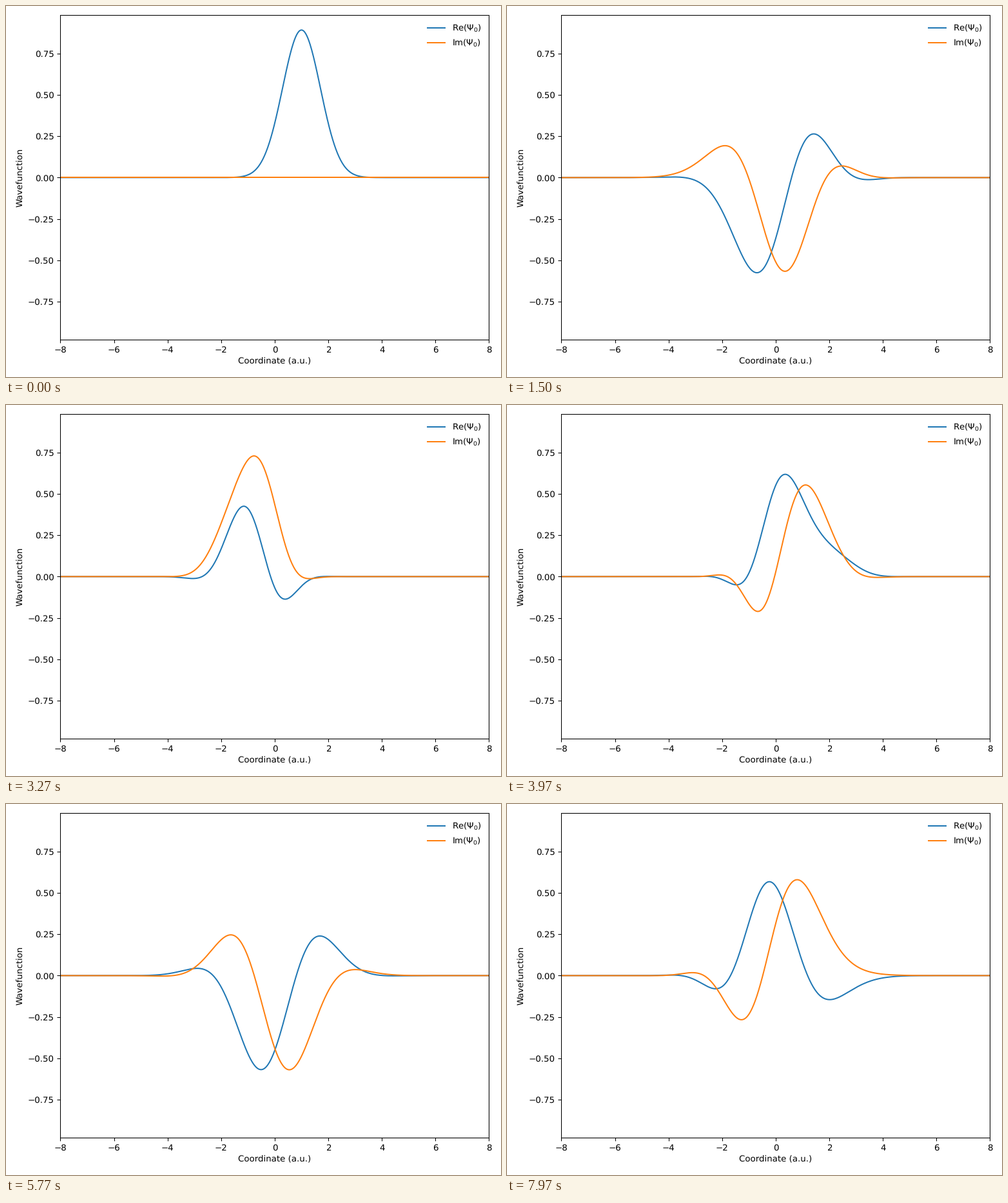
Write a matplotlib script that moves like this. It is 768x576 px and loops after 8000 ms.

```python
import numpy as np
import matplotlib.pyplot as plt
from matplotlib.animation import FuncAnimation

WIDTH, HEIGHT, DPI = 768, 576, 96
LOOP_MS = 8000
TICK_MS = 20  # whole milliseconds, so the loop length is exact
FPS = 30      # rate at which the wavefunction advances
DT = 0.1      # atomic time units per step

x = np.linspace(-8, 8, 801)


def wavefunction(t):
    """Gaussian exp(-(x - 1)^2) evolving in a unit harmonic well."""
    q, p = np.cos(t), -np.sin(t)
    width = np.cos(t) + 2j * np.sin(t)
    width_rate = -np.sin(t) + 2j * np.cos(t)
    # square root of width, continuous in t
    root = np.exp(0.5j * t) * np.sqrt(1.5 - 0.5 * np.exp(-2j * t))
    action = -np.sin(2 * t) / 4
    u = x - q
    phase = width_rate / (2 * width) * u**2 + p * u + action
    return (2 / np.pi) ** 0.25 / root * np.exp(1j * phase)


plt.rcParams.update({"font.family": "DejaVu Sans",
                     "text.hinting": "no_hinting"})
fig, ax = plt.subplots(figsize=(WIDTH / DPI, HEIGHT / DPI), dpi=DPI)
fig.subplots_adjust(left=84.4 / WIDTH, right=749.4 / WIDTH,
                    top=1 - 14.4 / HEIGHT, bottom=1 - 518.4 / HEIGHT)

psi0 = wavefunction(0)
re_line, = ax.plot(x, psi0.real, label=r"Re($\Psi_0$)")
im_line, = ax.plot(x, psi0.imag, label=r"Im($\Psi_0$)")

top = 1.1 * psi0.real.max()
ax.set_xlim(-8, 8)
ax.set_ylim(-top, top)
ax.set_xlabel("Coordinate (a.u.)")
ax.set_ylabel("Wavefunction")
ax.legend(loc="upper right", frameon=False, labelspacing=0.55)


def update(tick):
    step = round(tick * TICK_MS * FPS / 1000)
    psi = wavefunction(step * DT)
    re_line.set_ydata(psi.real)
    im_line.set_ydata(psi.imag)
    return re_line, im_line


anim = FuncAnimation(fig, update, frames=LOOP_MS // TICK_MS, interval=TICK_MS,
                     repeat=True, repeat_delay=0)
plt.show()
```
